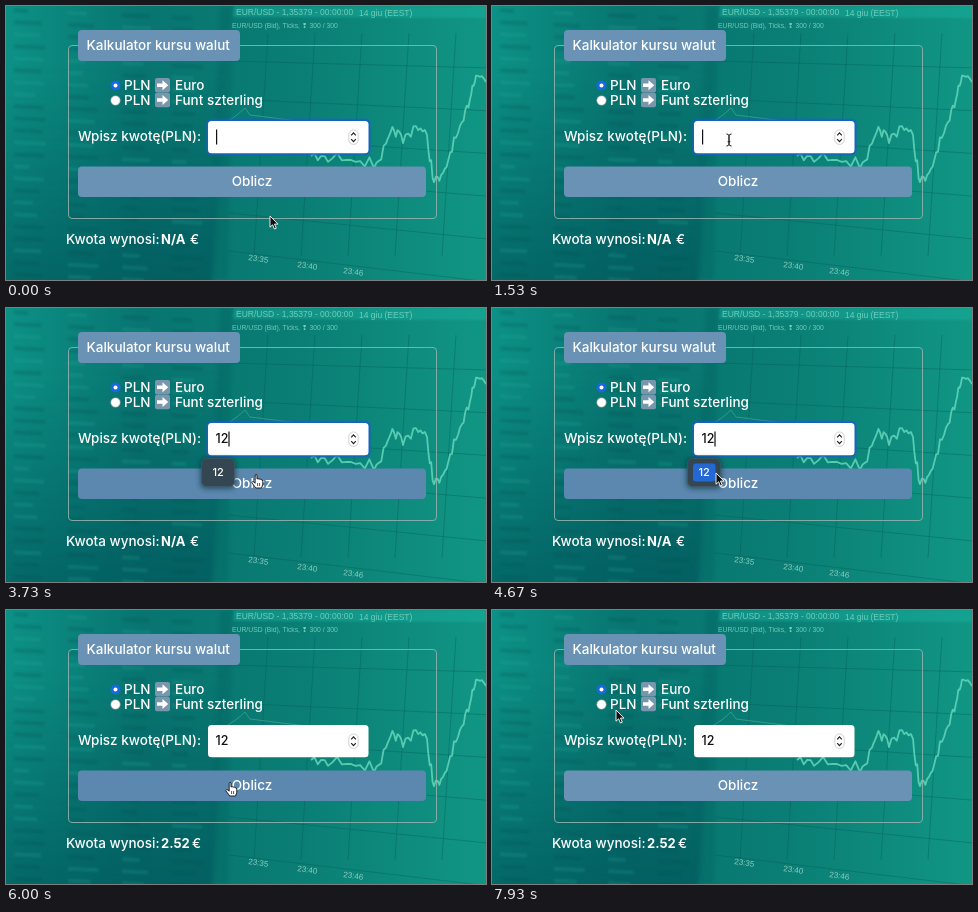
An HTML page that plays this animation: 480 px wide and 274 px high, repeating every 8 s.

```html
<!DOCTYPE html>
<html lang="pl">
<meta charset="utf-8">
<title>Kalkulator kursu walut</title>
<style>
html, body { margin: 0; width: 100%; height: 100%; overflow: hidden; background: #087169 }
svg { display: block; width: 480px; height: 274px }
text { font: 500 13.5px Inter, sans-serif; fill: #fff }
.bold { font-weight: 700; font-size: 13px }
.photo text { font: 8.5px "Liberation Sans", Arial, sans-serif; fill: #6fcdb9 }
.photo .ticks { font-size: 6.8px }
.photo .time { font-size: 8px; fill: #8fcdbf }
.value { font-size: 12.5px; fill: #111 }
</style>
<svg viewBox="0 0 480 274">
  <defs>
    <linearGradient id="teal" x1="0" x2="1">
      <stop offset="0" stop-color="#0c9186"/><stop offset=".28" stop-color="#087570"/>
      <stop offset=".6" stop-color="#0a7d74"/><stop offset="1" stop-color="#119684"/>
    </linearGradient>
    <linearGradient id="shade" x1="0" y1="0" x2="0" y2="1">
      <stop offset=".2" stop-color="#04545a" stop-opacity="0"/><stop offset="1" stop-color="#04545a" stop-opacity=".75"/>
    </linearGradient>
    <filter id="blur" x="-50%" y="-50%" width="200%" height="200%"><feGaussianBlur stdDeviation="2.5"/></filter>
    <filter id="soft"><feGaussianBlur stdDeviation=".8"/></filter>
  </defs>

  <g class="photo">
    <rect width="480" height="274" fill="url(#teal)"/>
    <path d="M-20 0H222L205 300H-20Z" fill="url(#shade)" filter="url(#blur)"/>
    <path d="M214 0H226L222 274H204Z" fill="#045b5c" opacity=".3" filter="url(#blur)"/>
    <path d="M228 0H480V12L227 11Z" fill="#1fb5a2" opacity=".4" filter="url(#soft)"/>
    <g id="rows" filter="url(#soft)"/>
    <path id="grid" fill="none" stroke="#045d59" stroke-width=".9" opacity=".45"/>
    <path id="rate" fill="none" stroke="#5fd3b9" stroke-width="1.8" stroke-linejoin="round" opacity=".9"/>
    <path d="M222 115L231 109L239 102L244 109L300 116" fill="none" stroke="#6fc4b2" stroke-width=".8" opacity=".5"/>
    <text x="230" y="9">EUR/USD - 1,35379 - 00:00:00</text>
    <text x="353" y="9.5">14 giu (EEST)</text>
    <text class="ticks" x="226" y="22">EUR/USD (Bid), Ticks, ❢ 300 / 300</text>
    <text class="time" transform="translate(242 254) rotate(8)">23:35</text>
    <text class="time" transform="translate(291 261) rotate(8)">23:40</text>
    <text class="time" transform="translate(337 267) rotate(8)">23:46</text>
  </g>

  <rect x="62.5" y="39.5" width="368" height="173" rx="3.5" fill="none" stroke="#8fb0ac" stroke-width=".9"/>
  <rect x="72" y="24" width="162" height="31" rx="4" fill="#6992b4"/>
  <text x="80.5" y="44">Kalkulator kursu walut</text>

  <circle cx="109.5" cy="79.5" r="5" fill="#1769e0"/><circle cx="109.5" cy="79.5" r="2" fill="#fff"/>
  <circle cx="109.5" cy="94.5" r="4.8" fill="#fff" stroke="#7b8587" stroke-width=".6"/>
  <text x="118" y="84">PLN</text><text x="169" y="84">Euro</text>
  <text x="118" y="98.5">PLN</text><text x="169" y="98.5">Funt szterling</text>
  <g id="arrow">
    <rect x="149" y="72" width="15" height="14.5" rx="2" fill="#7897ac"/>
    <path d="M151 77.5H156.5V74.2L162.2 79.2L156.5 84.2V81H151Z" fill="#fff"/>
  </g>
  <use href="#arrow" y="14.7"/>

  <text x="72" y="134.7">Wpisz kwotę(PLN):</text>
  <g id="ring">
    <rect x="199.5" y="112.5" width="165.5" height="37.3" rx="6" fill="#1760c4" opacity=".45"/>
    <rect x="200.8" y="113.8" width="162.9" height="34.7" rx="4.5" fill="#1760c4"/>
  </g>
  <rect x="202" y="115" width="160.5" height="32.3" rx="3.5" fill="#fff"/>
  <text id="amount" class="value" x="209.5" y="135.3"></text>
  <rect id="caret" y="123.5" width="1.2" height="15" fill="#111"/>
  <rect x="342.8" y="124" width="9.4" height="14.4" rx="4.5" fill="#fff" stroke="#c4c6c9" stroke-width=".8"/>
  <path d="M345.2 129.3L347.5 126.8L349.8 129.3M345.2 133.2L347.5 135.7L349.8 133.2" fill="none" stroke="#222" stroke-width="1.2"/>

  <rect id="button" x="72" y="160.5" width="348" height="30.5" rx="4"/>
  <text x="246" y="180" text-anchor="middle">Oblicz</text>
  <text x="60" y="237.5">Kwota wynosi:</text>
  <text id="result" class="bold" x="155" y="237.5"></text>
  <text id="euro" y="237.5">€</text>

  <g id="popup">
    <rect x="194" y="150" width="36" height="31" rx="6" fill="#062d38" opacity=".55" filter="url(#blur)"/>
    <rect x="195.5" y="150.5" width="33" height="28" rx="5" fill="#344652" stroke="#4b5d69" stroke-width=".6"/>
    <rect id="choice" x="201" y="155.5" width="22.5" height="18" rx="3" fill="#2468d4"/>
    <text x="212.2" y="168" text-anchor="middle" style="font-size:11px">12</text>
  </g>

  <g id="pointer" fill="#111" stroke="#fff" stroke-width=".9" stroke-linejoin="round">
    <path d="M0 0V11.2L2.6 8.8L4.4 13L6.3 12.2L4.5 8.1H8Z"/>
  </g>
  <g id="hand" fill="#fff" stroke="#111" stroke-width=".9" stroke-linejoin="round">
    <path d="M-1.8 6.5V1Q-1 -.7 0 1V5Q1.2 3.9 2 5.2Q3.2 4.3 4 5.7Q5.6 5.2 5.8 7V10.2L4.6 14H-1.2L-5.2 8.7Q-4.6 6.8 -3.2 8L-1.8 9.2Z"/>
    <path d="M.6 9V12M2.6 9V12" fill="none" stroke-width=".7"/>
  </g>
  <g id="beam" fill="none">
    <path id="stem" d="M-2.6 -6Q0 -6 0 -4V4Q0 6 -2.6 6M2.6 -6Q0 -6 0 -4V4Q0 6 2.6 6M-1.4 1.7H1.4" stroke="#222"/>
  </g>
</svg>
<script>
const $ = id => document.getElementById(id);
const show = (id, on) => $(id).style.display = on ? '' : 'none';
const clamp = x => Math.max(0, Math.min(1, x));
const ramp = (t, from, to) => clamp((t - from) / (to - from));
const ease = x => x * x * (3 - 2 * x);

let seed = 7;
const random = () => (seed = seed * 16807 % 2147483647) / 2147483647;

function drawPhoto() {
  let rows = '';
  for (let i = 0; i < 24; i++) {
    const y = 4 + i * 12;
    for (const x of [8, 62, 116, 166]) {
      const w = 14 + random() * 18;
      rows += `<path d="M${x} ${y + x / 22}l${w} ${w / 22}" stroke="${random() < .35 ? '#2ba799' : '#034c50'}" stroke-width="4" opacity=".22"/>`;
    }
  }
  $('rows').innerHTML = rows;

  let grid = '';
  for (let x = 256; x < 490; x += 47) grid += `M${x + 6} 27L${x - 8} 250`;
  for (let y = 55; y < 250; y += 38) grid += `M223 ${y}L480 ${y + y / 8}`;
  $('grid').setAttribute('d', grid);

  const points = [[305, 150], [322, 154], [345, 149], [368, 159], [380, 142], [388, 123], [397, 135],
    [410, 118], [421, 132], [428, 176], [437, 172], [446, 140], [456, 122], [464, 90], [470, 66], [480, 76]];
  let rate = 'M305 150';
  points.slice(1).forEach(([x, y], i) => {
    const [px, py] = points[i];
    for (let k = 1; k <= 5; k++) {
      rate += `L${px + (x - px) * k / 5} ${py + (y - py) * k / 5 + (random() - .5) * 12}`;
    }
  });
  $('rate').setAttribute('d', rate);
}

// Mouse path: time, x, y
const path = [[0, 264, 210], [530, 246, 167], [870, 246, 167], [1530, 237, 134], [2950, 237, 134],
  [3700, 251, 166], [4330, 249, 167], [4670, 224, 165], [5070, 224, 165], [5270, 225, 172],
  [6800, 225, 172], [7930, 124, 100], [8000, 124, 100]];

function mouse(t) {
  const i = path.findIndex(p => p[0] > t);
  const [t0, x0, y0] = path[i - 1], [t1, x1, y1] = path[i];
  const k = ease(ramp(t, t0, t1));
  return [x0 + (x1 - x0) * k, y0 + (y1 - y0) * k];
}

function render(t) {
  const [x, y] = mouse(t);
  const typed = t < 1950 ? '' : t < 2200 ? '1' : '12';
  const popup = t >= 2870 && t < 4870;
  const onChoice = popup && t > 3800 && x < 230;
  const onInput = x > 201 && x < 363 && y > 114 && y < 149;
  const onButton = x > 72 && x < 420 && y > 160 && y < 191;
  const done = t >= 5800;
  const hideMouse = t >= 1950 && t < 2950;

  $('amount').textContent = typed;
  $('caret').setAttribute('x', typed ? 209.8 + typed.length * 6.3 : 210);
  show('caret', t < 5470);
  $('ring').style.opacity = 1 - ramp(t, 5670, 5870);
  $('button').setAttribute('fill', onButton ? '#5c87ae' : '#6992b4');
  $('result').textContent = done ? '2.52' : 'N/A';
  $('euro').setAttribute('x', done ? 186 : 184);
  show('popup', popup);
  show('choice', onChoice);

  const kind = onInput ? 'beam' : onButton && !onChoice && !(t >= 4670 && t < 5070) ? 'hand' : 'pointer';
  for (const id of ['pointer', 'hand', 'beam']) {
    show(id, id === kind && !hideMouse);
    $(id).setAttribute('transform', `translate(${x} ${y})`);
  }
}

drawPhoto();
const start = performance.now();
function tick() {
  render((performance.now() - start) % 8000);
  requestAnimationFrame(tick);
}
tick();
</script>
</html>
```
